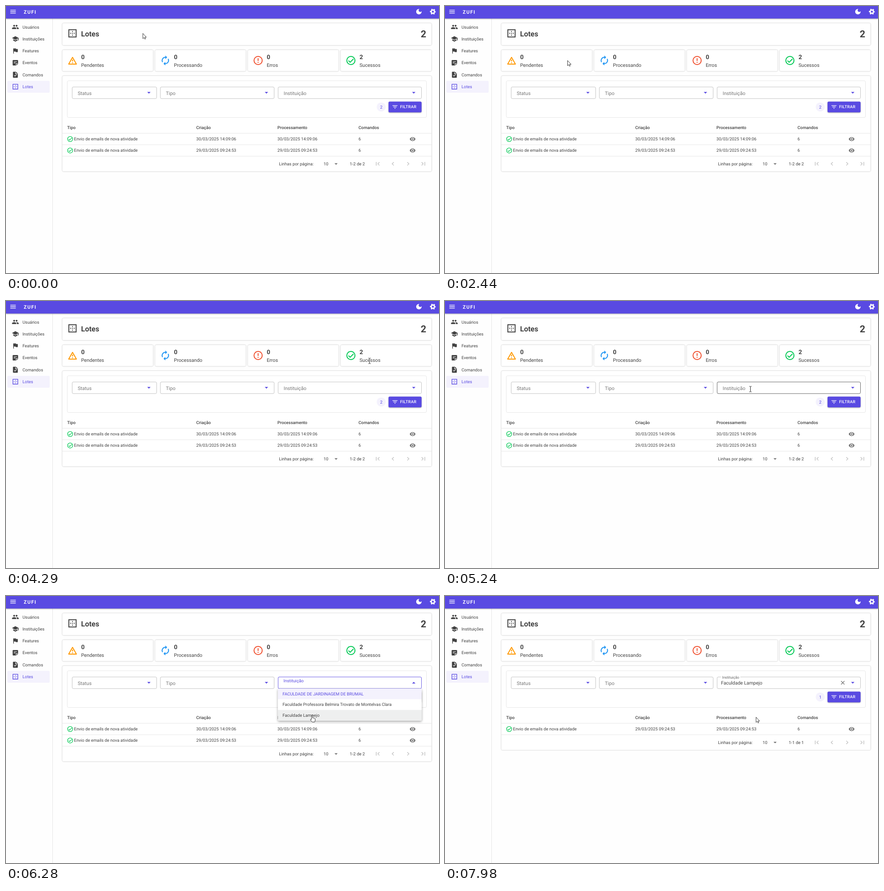
Animation of 952x588 px, one loop 8 s. Source, as an HTML page:

```html
<!DOCTYPE html>
<html lang="pt-BR">
<head>
<meta charset="utf-8">
<title>Lotes</title>
<style>
html, body { margin: 0; width: 100%; height: 100%; overflow: hidden; background: #fefefe; }
svg { display: block; }
#stage { position: absolute; left: 0; top: 0; }
text { font-family: Roboto, "Noto Sans", sans-serif; fill: #424242; white-space: pre; text-rendering: geometricPrecision; }
.card { fill: #fff; filter: drop-shadow(0 .8px .8px rgba(0,0,0,.32)); }
.raised { filter: drop-shadow(0 1.2px 1.2px rgba(0,0,0,.35)); }
.popup { filter: drop-shadow(0 2.5px 2.5px rgba(0,0,0,.38)); }
</style>
</head>
<body>
<svg id="stage" width="952" height="588" viewBox="0 0 952 588"></svg>
<script>
const DURATION = 8000;
const PRIMARY = '#594ae2', DARK = '#424242', GREEN = '#00c853', TINT = '#f4f2fd';

const text = (x, y, label, size = 9.33, opts = '') =>
  `<text x="${x}" y="${y}" font-size="${size}" ${opts}>${label}</text>`;
const rect = (x, y, w, h, opts = '') =>
  `<rect x="${x}" y="${y}" width="${w}" height="${h}" ${opts}/>`;
const line = y => `<path d="M124 ${y}H936" stroke="#e0e0e0" stroke-width=".8"/>`;
const card = (x, y, w, h, id = '') => rect(x, y, w, h, `class="card" rx="2.7" ${id}`);
const fill = d => `<path d="${d}"/>`;
const stroke = (d, width = 2) =>
  `<path d="${d}" fill="none" stroke="currentColor" stroke-width="${width}"/>`;
const ring = (r, width = 2, opts = '') =>
  `<circle cx="12" cy="12" r="${r}" fill="none" stroke="currentColor" stroke-width="${width}" ${opts}/>`;

// Icons are drawn on a 24 unit grid.
const icons = {
  menu: stroke('M3 7H21M3 12H21M3 17H21'),
  moon: fill('M12 3a9 9 0 1 0 9 9c0-.5 0-.9-.1-1.4a5.4 5.4 0 1 1-7.5-7.5C12.9 3 12.5 3 12 3z'),
  gear: ring(5.6, 4.2) + ring(8.6, 3, 'pathLength="12" stroke-dasharray="1 1" stroke-dashoffset=".5"'),
  people: '<circle cx="8" cy="8" r="3"/><circle cx="16" cy="8" r="3"/>' +
    fill('M8 13c-2.3 0-7 1.2-7 3.5V19h14v-2.5C15 14.2 10.3 13 8 13z') +
    fill('M16 13l-1 .1c1.2.8 2 1.9 2 3.4V19h6v-2.5c0-2.3-4.7-3.5-7-3.5z'),
  school: fill('M5 13.2v4L12 21l7-3.8v-4L12 17zM12 3L1 9l11 6 9-4.9V17h2V9z'),
  flag: fill('M14.4 6L14 4H5v17h2v-7h5.6l.4 2h7V6z'),
  note: fill('M5 3H19a2 2 0 0 1 2 2V15l-6 6H5a2 2 0 0 1-2-2V5a2 2 0 0 1 2-2z') +
    '<path d="M7 8.5H17M7 12.5H12M14.5 20V14.5H20" fill="none" stroke="#fff" stroke-width="1.8"/>',
  task: fill('M14 2H6a2 2 0 0 0-2 2V20a2 2 0 0 0 2 2H18a2 2 0 0 0 2-2V8z') +
    '<path d="M8.1 13.8l2.8 2.8 5-5M13 3.5V9H18.5" fill="none" stroke="#fff" stroke-width="1.8"/>',
  grid: stroke('M4 4H20V20H4zM11 8h2M7 12h2M11 12h2M15 12h2M11 16h2'),
  warning: '<g stroke-linejoin="round">' + stroke('M12 5L3.5 20H20.5zM12 10v4M12 16v2') + '</g>',
  renew: fill('M12 6v3l4-4-4-4v3a8 8 0 0 0-6.8 12.3l1.5-1.5A6 6 0 0 1 12 6z') +
    fill('M18.8 7.7L17.3 9.2A6 6 0 0 1 12 18v-3l-4 4 4 4v-3A8 8 0 0 0 18.8 7.7z'),
  error: ring(9) + stroke('M12 7v6M12 15v2'),
  check: ring(9) + stroke('M6.7 12.3l3.6 3.6 7.4-7.4'),
  eye: '<path fill-rule="evenodd" d="M12 4.5C7 4.5 2.7 7.6 1 12c1.7 4.4 6 7.5 11 7.5s9.3-3.1 11-7.5c-1.7-4.4-6-7.5-11-7.5zM12 17a5 5 0 1 1 0-10 5 5 0 0 1 0 10z"/><circle cx="12" cy="12" r="3"/>',
  filter: stroke('M3 7H21M6 12H18M10 17h4'),
  down: fill('M6.5 9.5l5.5 5.5 5.5-5.5z'),
  close: stroke('M6 6L18 18M18 6L6 18'),
  first: stroke('M7 6V18M17.7 6.7L12.4 12l5.3 5.3'),
  prev: stroke('M14.7 6.7L9.4 12l5.3 5.3'),
  next: stroke('M9.3 6.7l5.3 5.3-5.3 5.3'),
  last: stroke('M17 6V18M6.3 6.7L11.6 12l-5.3 5.3'),
};
const icon = (name, cx, cy, size, color, opts = '') =>
  `<g ${opts}><g transform="translate(${cx - size / 2} ${cy - size / 2}) scale(${size / 24})" fill="${color}" color="${color}">${icons[name]}</g></g>`;

const topBar = rect(0, 0, 952, 27.6, `fill="${PRIMARY}" class="raised"`) +
  icon('menu', 15.5, 12.5, 16, '#fff') +
  text(39, 16.5, 'ZUFI', 10.67, 'font-weight="700" letter-spacing="1.5" style="fill:#fff"') +
  icon('moon', 907.8, 12.5, 16, '#fff') + icon('gear', 938.5, 12.5, 15.5, '#fff');

const menu = [['people', 'Usuários'], ['school', 'Instituições'], ['flag', 'Features'],
  ['note', 'Eventos'], ['task', 'Comandos'], ['grid', 'Lotes']];
const sideBar = rect(102, 27.6, .9, 561, 'fill="#e2e2e2"') +
  rect(3, 164.8, 93, 26.2, `fill="${TINT}" rx="2.7"`) +
  menu.map(([name, label], i) => {
    const y = 46.2 + i * 26.3, color = i === 5 ? PRIMARY : DARK;
    return icon(name, 20.6, y, 16, color) + text(36.3, y + 3.3, label, 9.33, `style="fill:${color}"`);
  }).join('');

const stats = [['warning', '#ff9800', 0, 'Pendentes'], ['renew', '#2196f3', 0, 'Processando'],
  ['error', '#f0502f', 0, 'Erros'], ['check', GREEN, 2, 'Sucessos']];
const summary = card(124, 38, 811.5, 48.3) + icon('grid', 146.2, 60.3, 24, DARK) +
  text(165, 67, 'Lotes', 16, 'font-weight="600"') +
  text(911.8, 69.3, '2', 21.33, 'font-weight="600"') +
  stats.map(([name, color, count, label], i) => {
    const x = 124 + i * 204;
    return card(x, 96.7, 199.3, 46.8) + icon(name, x + 22.3, 120, 24, color) +
      text(x + 41.2, 117.3, count, 13.33, 'font-weight="600"') + text(x + 41.2, 134, label, 10.67);
  }).join('');

const fields = [[145.5, 185.7, 'Status'], [339.3, 250.3, 'Tipo'], [598.3, 315.2, 'Instituição']];
const field = ([x, w, label], i) =>
  rect(x, 178.3, w, 25.6, `id="box${i}" rx="2.7" fill="none"`) +
  (i === 2 ? rect(606.5, 176.8, 43, 3, 'id="notch" fill="#fff"') : '') +
  text(x + 12.2, 195.6, label, 10.67, `id="label${i}" style="fill:#757575"`) +
  icon('down', x + w - 17, 191, 16, PRIMARY, `id="arrow${i}"`);
const filters = card(124, 154, 811.5, 210.3, 'id="panel"') +
  rect(134.8, 164.7, 789.7, 80.8, 'fill="none" stroke="#e0e0e0" stroke-width=".8" rx="2.7"') +
  fields.map(field).join('') +
  `<g id="value">${text(606.8, 194.5, 'Faculdade Lampejo', 10.45)}${icon('close', 874.5, 191, 15, '#757575')}</g>` +
  `<circle cx="825" cy="222.4" r="10" fill="${TINT}"/>` +
  text(825, 226, '2', 9.33, `id="badge" text-anchor="middle" style="fill:${PRIMARY}"`) +
  rect(841, 210.4, 72.7, 23.8, 'id="button" class="raised" rx="2.7"') +
  icon('filter', 855.2, 222.3, 14.5, '#fff') +
  text(866.4, 225.3, 'FILTRAR', 9.1, 'font-weight="500" letter-spacing=".2" style="fill:#fff"');

const columns = [[134.4, 'Tipo'], [418.2, 'Criação'], [596.8, 'Processamento'], [775, 'Comandos']];
const row = (y, date) => icon('check', 141, y, 15, GREEN) +
  text(149.6, y + 3, 'Envio de emails de nova atividade') +
  text(418.2, y + 3, date) + text(596.8, y + 3, date) + text(775, y + 3, '6') +
  icon('eye', 894, y, 14, '#757575') + line(y + 12.6);
const pager = text(600.2, 351, 'Linhas por página:') + text(698.3, 351, '10') +
  icon('down', 725.7, 347.8, 15, '#757575') + text(755.8, 351, '1-2 de 2', 9.33, 'id="range"') +
  ['first', 'prev', 'next', 'last'].map((name, i) => icon(name, 817.3 + i * 33.4, 347.6, 16, '#bdbdbd')).join('');
const table = columns.map(([x, label]) => text(x, 271, label, 9.33, 'font-weight="500"')).join('') + line(280.3) +
  `<g id="newest">${row(293, '30/03/2025 14:09:06')}</g>` +
  `<g id="tail">${row(318.2, '29/03/2025 09:24:53')}${pager}</g>`;

const options = ['FACULDADE DE JARDINAGEM DE BRUMAL',
  'Faculdade Professora Belmira Trovato de Montelvas Clara', 'Faculdade Lampejo'];
const dropdown = '<g id="dropdown">' + rect(597.8, 204, 316, 70.4, 'fill="#fff" rx="2" class="popup"') +
  options.map((label, i) => rect(597.8, 204 + i * 23.46, 316, 23.5, `id="option${i}"`) +
    text(608, 218.6 + i * 23.7, label, 9.33, i ? '' : `style="fill:${PRIMARY}"`)).join('') + '</g>';

const beam = 'M-2.5-6H-.8L0-5.3L.8-6H2.5M-2.5 6H-.8L0 5.3L.8 6H2.5M0-5.3V5.3';
const outline = 'fill="#fff" stroke="#222" stroke-width=".9" stroke-linejoin="round"';
const pointer = '<g id="pointer">' +
  `<path id="normal" d="M.4.3V11.8L3 9.5 4.8 13 6.5 12.2 4.8 8.8H8.2Z" ${outline}/>` +
  `<g id="caret" fill="none"><path d="${beam}" stroke="#fff" stroke-width="2"/><path d="${beam}" stroke="#222"/></g>` +
  `<path id="hand" d="M-1.2 9V.6a1.2 1.2 0 0 1 2.4 0V5.3L5.4 6.2Q6.8 6.6 6.8 8V11L5.5 14.6H.2L-3.6 10Q-4 8.4-2.6 8.2Z" ${outline}/></g>`;

const stage = document.getElementById('stage');
stage.innerHTML = summary + filters + table + sideBar + topBar + dropdown + pointer;
const el = id => document.getElementById(id);

// Pointer path: time, x, y
const path = [
  [40, 300.5, 60], [250, 348, 63], [420, 300, 60], [800, 143, 56], [890, 143, 58],
  [1010, 165, 62], [1300, 640, 66], [1530, 918, 62], [1610, 927, 72], [1690, 877, 57],
  [2300, 215, 119], [2520, 296, 120], [2800, 430, 126], [3150, 621, 104], [3310, 604.5, 113],
  [3370, 603.5, 117], [3800, 780, 132], [4050, 865, 122], [4180, 850, 120],
  [4700, 560, 188], [5000, 676, 196], [5240, 671.5, 194], [5640, 671.5, 194],
  [6070, 673, 263], [6480, 673, 263], [7030, 877, 223], [7400, 877, 223], [7980, 683.5, 266.5],
];
const clamp = v => Math.min(1, Math.max(0, v));
const progress = (t, start, length) => clamp((t - start) / length);
function pointerAt(t) {
  const i = path.findIndex(p => p[0] > t);
  if (i === 0) return path[0].slice(1);
  if (i < 0) return path.at(-1).slice(1);
  const [a, b] = [path[i - 1], path[i]];
  const u = progress(t, a[0], b[0] - a[0]), k = u * u * (3 - 2 * u) * .4 + u * .6;
  return [a[1] + (b[1] - a[1]) * k, a[2] + (b[2] - a[2]) * k];
}

const set = (id, attrs) => Object.entries(attrs).forEach(([k, v]) => el(id).setAttribute(k, v));
const show = (id, visible) => { el(id).style.display = visible ? '' : 'none'; };

const OPEN = 5440, PICK = 6250, APPLY = 7280, RESULT = 7440;
const textAreas = [[165, 52, 39, 18], [911, 51, 14, 23],
  ...[50, 62, 25, 46].map((w, i) => [165 + i * 204, 107, w, 30])];

function render(t) {
  const [x, y] = pointerAt(t);
  const inside = ([left, top, w, h]) => x >= left && x <= left + w && y >= top && y <= top + h;
  const open = t >= OPEN && t < PICK + 110;
  const focused = t >= OPEN && t < APPLY;
  const onButton = !open && inside([841, 210, 73, 24]);
  const hovered = fields.map(([left, w]) => inside([left, 178, w, 26]));
  const onOption = open && inside([598, 204, 316, 71]);

  const kind = onButton || onOption ? 'hand'
    : hovered.some(Boolean) || textAreas.some(inside) ? 'caret' : 'normal';
  ['normal', 'caret', 'hand'].forEach(id => show(id, id === kind));
  set('pointer', { transform: `translate(${x} ${y})` });

  fields.forEach((_, i) => {
    const active = i === 2 && focused;
    set('box' + i, {
      stroke: active ? PRIMARY : hovered[i] ? '#555' : '#bdbdbd',
      'stroke-width': active && t > PICK + 60 ? 1.4 : .9,
    });
  });

  const rise = 1 - (1 - progress(t, PICK - 10, 200)) ** 2.4;
  set('label2', { x: 610.5 - rise, y: 195.6 - 13.8 * rise, 'font-size': 10.67 - 2.67 * rise });
  el('label2').style.fill = focused ? PRIMARY : t >= APPLY ? '#616161' : '#757575';
  show('notch', rise > .6);
  show('value', t >= PICK + 50);
  set('arrow2', { transform: open ? 'rotate(180 896.5 191)' : '' });

  show('dropdown', open);
  set('dropdown', { opacity: progress(t, OPEN, 120) * (1 - progress(t, PICK + 40, 70)) });
  options.forEach((_, i) => {
    const over = onOption && Math.min(2, Math.floor((y - 204) / 23.46)) === i;
    set('option' + i, { fill: over ? '#eeefef' : i ? '#fff' : TINT });
  });

  set('button', { fill: onButton ? '#3f2cda' : PRIMARY });
  const filtered = t >= RESULT;
  el('badge').textContent = filtered ? '1' : '2';
  el('range').textContent = filtered ? '1-1 de 1' : '1-2 de 2';
  show('newest', !filtered);
  set('tail', { transform: `translate(0 ${filtered ? -25.2 : 0})` });
  set('panel', { height: filtered ? 185.1 : 210.3 });
}

function frame() {
  render(performance.now() % DURATION);
  requestAnimationFrame(frame);
}
frame();
</script>
</body>
</html>
```
